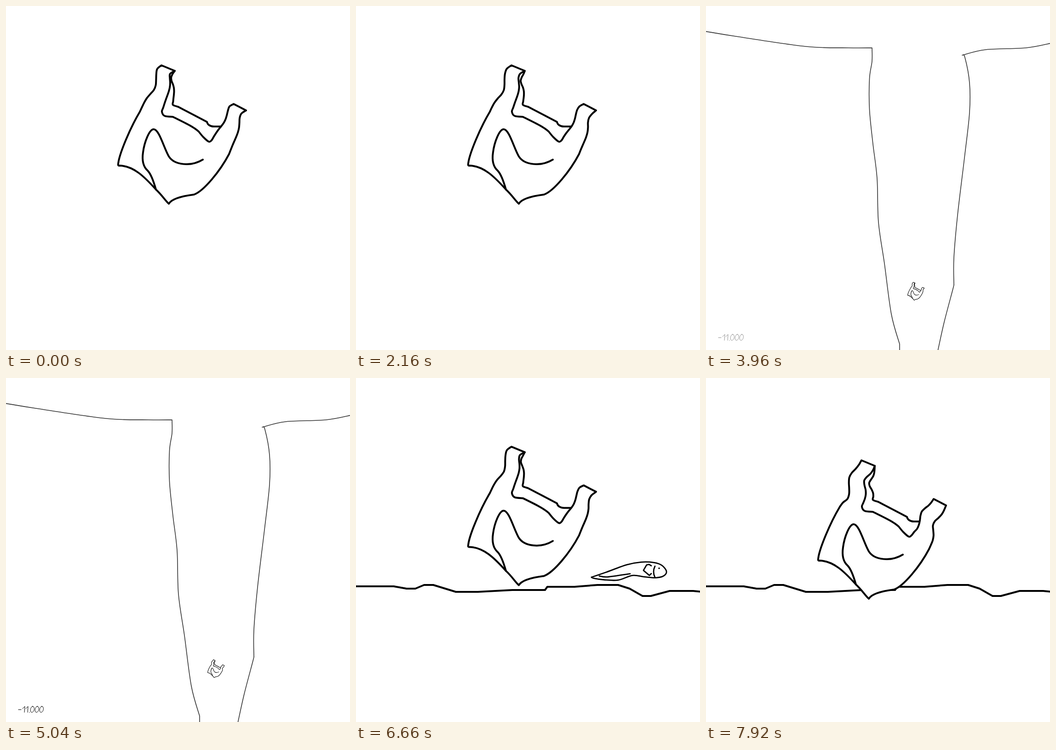
An HTML page that plays this animation: 748 px wide and 748 px high, repeating every 8 s.

```html
<!DOCTYPE html>
<html lang="en">
<head>
<meta charset="utf-8">
<title>Sinking bag</title>
<style>
  html, body { margin: 0; width: 100%; height: 100%; overflow: hidden; background: #fff; }
  svg { display: block; width: 100vw; height: 100vh; }
  path, circle { fill: none; stroke: #000; stroke-linecap: round; stroke-linejoin: round; }
  .filled { fill: #fff; }
  #bag { stroke-width: 4; }
  #bag path { stroke-width: inherit; }
  #bag .backing { fill: #fff; stroke: none; }
  #bubbles circle { stroke-width: 2.2; }
  #trench path { stroke: #333; stroke-width: 1.6; }
  #depth path { stroke: #222; stroke-width: 1.25; }
  #ground { stroke-width: 4; }
  #fish path { stroke-width: 2.8; }
  #fish .eye { fill: #000; stroke: none; }
</style>
</head>
<body>
<svg viewBox="0 0 748 748">
  <defs>
    <path id="one" d="M0 5L5 0 4 13"/>
    <path id="zero" d="M7 0C1 -1 -1 13 4 13C10 13 12 -1 5 0"/>
  </defs>

  <g id="bubbles">
    <circle id="bubbleA" r="10.4"/>
    <circle id="bubbleB" r="10.2"/>
  </g>

  <g id="trench">
    <path id="leftWall"/>
    <path id="rightWall"/>
  </g>
  <g id="depth" role="img" aria-label="-11.000">
    <path d="M27 721H33M51 727V727.4"/>
    <use href="#one" x="36" y="714"/>
    <use href="#one" x="43" y="714"/>
    <use href="#zero" x="52" y="714"/>
    <use href="#zero" x="62" y="714"/>
    <use href="#zero" x="72" y="714"/>
  </g>

  <path id="ground" d="M-4 453H82L110 458H129L148 450H168L217 465H265L340 461H411L416 454H475L525 450H570L595 458 623 474H641L682 463H733L752 465"/>
  <g id="fish">
    <path id="fishBody" class="filled"/>
    <path id="fishFin"/>
    <path d="M592 407L587 404 582 405 575 417 588 428 592 424M600 408Q594 420 600 432"/>
    <circle class="eye" cx="609" cy="412.5" r="1.8"/>
  </g>

  <g id="bag">
    <path id="backing" class="backing"/>
    <path id="back"/>
    <path id="front" class="filled"/>
    <path d="M326 399C320 378 315 365 308 358C299 350 295 338 298 318C301 295 312 268 321 268C333 268 343 308 354 327C366 346 402 350 428 334"/>
  </g>
</svg>
<script>
const FRAME = 180, LOOP = 8000, SINK = 16, FLOOR = 34;
const FAST = 14, SLOW = 28;   // frames per sway of the handles
const $ = id => document.getElementById(id);
const clamp = p => Math.min(1, Math.max(0, p));
const bell = x => Math.exp(-x * x);
const wave = t => (1 - Math.cos(2 * Math.PI * t)) / 2;
const setPath = (id, d) => $(id).setAttribute('d', d);
const move = (id, x, y) => $(id).setAttribute('transform', `translate(${x} ${y})`);
const show = (id, on) => { $(id).style.display = on ? '' : 'none'; };

// Smooth curve through points, continuing from the first one
function curve(pts) {
  const at = i => pts[Math.min(pts.length - 1, Math.max(0, i))];
  let d = '';
  for (let i = 0; i < pts.length - 1; i++) {
    const [a, b, c, e] = [at(i - 1), at(i), at(i + 1), at(i + 2)];
    const p = [0, 1].map(k => b[k] + (c[k] - a[k]) / 6);
    const q = [0, 1].map(k => c[k] - (e[k] - b[k]) / 6);
    d += 'C' + [...p, ...q, ...c].map(v => v.toFixed(2)).join(' ');
  }
  return d;
}
const stroke = pts => `M${pts[0]}` + curve(pts);

// Handle edge from foot to top: a crest with a dip below it bends the straight line
function edge([x0, y0], [x1, y1], crest, up, dip) {
  const dx = x1 - x0, dy = y1 - y0, len = Math.hypot(dx, dy);
  const lift = up * (1.9 - 1.3 * crest);
  return Array.from({ length: 11 }, (_, i) => {
    const s = i / 10;
    const pin = Math.min(1, 5 * s, 12 * (1 - s));
    const bend = pin * (lift * bell((s - crest) / .18) - dip * bell((s - crest + .4) / .18));
    return [x0 + dx * s + dy / len * bend, y0 + dy * s - dx / len * bend];
  });
}

// sway: 0 = crest near the top of the handles, 1 = halfway down
function drawBag(sway) {
  const crest = .88 - .38 * sway;
  const tip = [367, 141];
  const outL = edge([291, 230], [338, 129], crest + .06, 8, 8);
  const inL = edge([339, 230], tip, crest + .03, 11, 1).reverse();
  const backL = edge([363, 215], tip, crest - .1, 8, 1).reverse();
  const inR = edge([447, 292], [495, 213], crest + .03, 7, 3);
  const outR = edge([485, 322], [522, 227], crest - .03, 9.5, 1).reverse();

  const rim = stroke([...backL, [374, 219]]) + 'L437 252C438 258 444 262 452 262H470';
  setPath('back', rim);
  setPath('backing', rim + 'L445 294 419 273 363 241 343 232Z');
  setPath('front', 'M247 347Q243 348 244 343C246 322 270 265 291 230'
    + curve(outL) + `L${tip}`
    + curve([...inL, [345, 239], [363, 241]]) + 'C385 252 407 262 419 273'
    + curve([[419, 273], [429, 285], [441, 295], ...inR]) + 'L522 227'
    + curve(outR)
    + 'C465 360 430 402 409 410C385 413 361 418 354 430C346 423 340 412 326 399C300 370 277 348 247 347Z');
}

// The tail stretches back and flattens as the fish pushes off
function drawFish(k) {
  const push = wave(k / 10);
  const bendTail = (pts, stretch) => pts.map(([x, y]) => {
    const w = push * clamp((550 - x) / 75);
    return [x - stretch * w, y + (435 - y) * w];
  });
  const tail = [473, 426];
  setPath('fishBody', stroke(bendTail([
    tail, [500, 411], [540, 402], [570, 399], [598, 400], [615, 406], [625, 419],
    [619, 429], [602, 433], [577, 431], [551, 428], [524, 439], [497, 439.5], [478, 433], tail
  ], 17)));
  setPath('fishFin', stroke(bendTail([[479, 420], [497, 428], [546, 424]], 0)));
  move('fish', 5.7 * k + 3.66 * k * k, 2 * push);
}

// One bubble rises steadily, the other drifts out to the right and slows down
function drawBubbles(f) {
  const u = 7 - f, v = Math.max(0, u);
  move('bubbleA', 429.5 - 4.9 * u, 64 + 28 * u);
  move('bubbleB', 597.5 - 9.4 * v - 2.1 * v * v, 163.5 + 31 * u);
}

function draw(f) {
  const deep = f >= SINK && f < FLOOR, floor = f >= FLOOR;
  const t = f - (floor ? FLOOR : deep ? SINK : 0);
  show('bubbles', f < 12);
  show('trench', deep);
  show('depth', deep);
  show('ground', floor);
  show('fish', floor && t < 8);
  drawBag(wave(t / (deep || floor ? SLOW : FAST)));

  $('bag').style.strokeWidth = deep ? 8 : 4;
  if (deep) {
    $('bag').setAttribute('transform', `translate(406.8 ${572.3 + 1.95 * t}) scale(.13)`);
    $('depth').style.opacity = clamp((t - 3) / 7);
  } else {
    move('bag', 0, floor ? Math.min(50, 6.8 * t) : 0);
    if (floor) drawFish(t); else drawBubbles(t);
  }
}

setPath('leftWall', stroke([[-2, 55], [65, 66], [217, 88], [310, 91], [361, 91]])
  + curve([[361, 91], [361, 120], [355.5, 158], [355.5, 225], [363, 300], [372, 375],
    [375, 470], [388, 560], [403, 670], [421, 735]]) + 'V750');
setPath('rightWall', stroke([[750, 81], [696, 91], [608, 95], [557, 107]])
  + curve([[557, 107], [563, 112], [573, 167], [573, 232], [562, 330], [547, 455], [539, 548], [539, 605]])
  + curve([[539, 605], [537, 615], [518, 687], [504, 750]]));

const start = performance.now();
let last = -1;
function tick() {
  const f = Math.floor((performance.now() - start) % LOOP / FRAME);
  if (f !== last) draw(last = f);
  requestAnimationFrame(tick);
}
tick();
</script>
</body>
</html>
```
